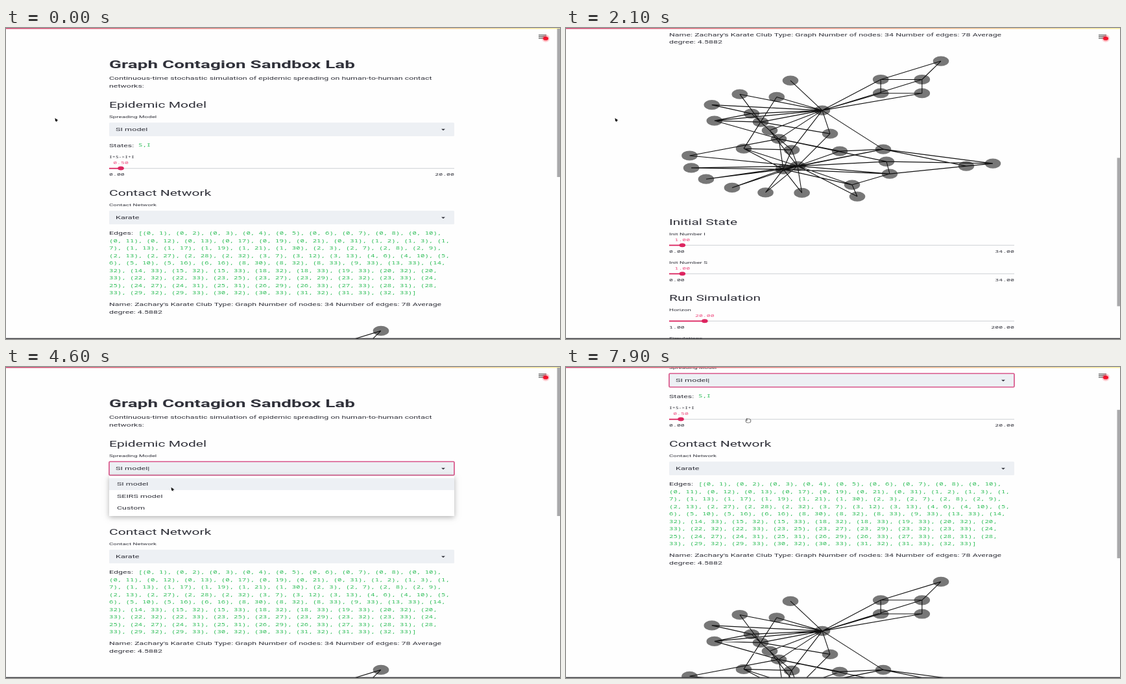
An HTML page with a canvas for the animation above (8 s loop, 854 by 480 pixels).

```html
<!DOCTYPE html>
<html lang="en">
<head>
<meta charset="utf-8">
<title>Graph Contagion Sandbox Lab</title>
<style>
  html, body { margin: 0; width: 854px; height: 480px; overflow: hidden; background: #fefefe; }
  canvas { display: block; }
</style>
</head>
<body>
<canvas id="stage" width="854" height="480"></canvas>
<script>
const ctx = document.getElementById('stage').getContext('2d');
const LOOP = 8000, STEP = 100;
const LEFT = 159, RIGHT = 691, WIDTH = RIGHT - LEFT;
const KX = 0.762, KY = 0.45;            // the whole page is shown wide and flat
const INK = '#30313a', PINK = '#dd2560', FIELD = '#edf0f4', GREEN = '#2dbd57';
const SANS = 'Roboto, sans-serif', MONO = '"Noto Sans Mono", "Liberation Mono", monospace';

// The karate club as circles of friends: members all know each other,
// and each guest knows every member.
const links = new Map();
function join(members, ...guests) {
  const link = (a, b) => links.set(a * 100 + b, [a, b]);
  members.forEach((a, i) => {
    members.slice(i + 1).forEach(b => link(a, b));
    guests.forEach(b => link(Math.min(a, b), Math.max(a, b)));
  });
}
join([0, 1, 2, 3], 7, 13);
join([0, 1], 17, 19, 21);
join([0, 4], 6, 10);
join([0, 5], 6, 10);
join([5, 6], 16);
join([0, 2], 8);
join([0, 3], 12);
join([0], 11, 31);
join([1], 30);
join([2], 9, 27, 28, 32);
join([32, 33], 14, 15, 18, 20, 22, 31);
join([8, 30, 32, 33]);
join([23, 29, 32, 33]);
join([33], 9, 13, 19, 26, 27, 28);
join([24, 25], 31);
join([23], 25, 27);
join([24], 27);
join([26], 29);
join([28], 31);
const edges = [...links.keys()].sort((a, b) => a - b).map(key => links.get(key));

// Nodes are laid out in rows and arcs
const nodes = [];
const row = (ids, x, y, dx = 0, dy = 0) =>
  ids.forEach((id, i) => nodes[id] = [x + i * dx, y + i * dy]);
const arc = (ids, x, y, rx, ry, from, turn) => ids.forEach((id, i) => {
  const a = (from + i * turn) * Math.PI / 180;
  nodes[id] = [x + rx * Math.cos(a), y + ry * Math.sin(a)];
});
row([0, 19], 395, 128, 12, 36);
row([3, 1, 13, 2], 286, 133, 14, 13);
row([30, 8, 28], 274, 187, 74, 2);
row([31, 27, 23], 489, 188, 5, 19);
row([25, 24], 617, 214, 41, -4);
row([29, 26], 441, 243, 8, 18);
row([32, 33], 335, 219, 22, -5);
row([11], 346, 82);
row([16], 578, 52);
arc([4, 6, 5, 10], 517, 91, 45, 15, 135, 90);
arc([7, 12, 17, 21], 286, 130, 66, 28, 150, 52);
arc([9, 14, 15, 18, 20, 22], 340, 205, 151, 51, 188, -21.4);

// Wrapped edge list; the first line leaves room for its label
function wrap(words, room) {
  const lines = [''];
  for (const word of words) {
    const last = lines.length - 1, next = (lines[last] + ' ' + word).trim();
    if (next.length > (last ? room : room - 7)) lines.push(word);
    else lines[last] = next;
  }
  return lines;
}
const edgeLines = wrap(`[${edges.map(e => `(${e.join(', ')})`).join(', ')}]`.split(' '), 83);

// Motion: progress from 0 to 1 between two times
const ramp = (t, from, to) => Math.max(0, Math.min(1, (t - from) / (to - from)));
const ease = p => p * p * (3 - 2 * p);
const scrollAt = t =>
  435 * (ramp(t, 0, 1810) - ease(ramp(t, 2000, 2800))) + 136 * ramp(t, 7200, 7800);
function pointerAt(t) {
  const enter = ramp(t, 2700, 3300), choose = ramp(t, 4200, 5100), rise = ramp(t, 5400, 5600);
  const leave = ramp(t, 6600, 6900), back = ramp(t, 7200, 7600);
  return [
    77 + 156 * enter + 52 * choose - 213 * leave + 209 * back,
    142 + 24 * enter + 51 * choose - 41 * rise - 2 * leave - 91 * back
  ];
}

// y is the middle of the capitals
function text(s, x, y, { size = 16.3, weight = 400, font = SANS, color = INK, align = 'left' } = {}) {
  ctx.save();
  ctx.translate(x, y + 0.36 * size * KY);
  ctx.scale(KX, KY);
  ctx.font = `${weight} ${size}px ${font}`;
  ctx.fillStyle = color;
  ctx.textAlign = align;
  ctx.fillText(s, 0, 0);
  ctx.restore();
}
const heading = (s, y) => text(s, LEFT, y, { size: 27.6 });
const label = (s, y) => text(s, LEFT, y, { size: 12.8 });
const mono = (s, x, y, style) => text(s, x, y, { size: 13, font: MONO, ...style });
const code = (s, x, y) => mono(s, x, y, { size: 14, color: GREEN });

function rect(x, y, w, h, color) {
  ctx.fillStyle = color;
  ctx.fillRect(x, y, w, h);
}
function ellipse(x, y, rx, ry, color) {
  ctx.beginPath();
  ctx.ellipse(x, y, rx, ry, 0, 0, 7);
  ctx.fillStyle = color;
  ctx.fill();
}
function polygon(color, ...points) {
  ctx.beginPath();
  points.forEach(p => ctx.lineTo(...p));
  ctx.fillStyle = color;
  ctx.fill();
}

function slider(name, y, min, value, max, style) {
  const knob = LEFT + 5 + (WIDTH - 10) * (value - min) / (max - min);
  text(name, LEFT, y, { size: 12.8, ...style });
  mono(value.toFixed(2), knob, y + 9, { color: '#ee4d80', align: 'center' });
  rect(LEFT, y + 17, WIDTH, 1.3, '#d8dadd');
  rect(LEFT, y + 16.8, knob - LEFT, 1.8, PINK);
  ellipse(knob, y + 17.6, 4.8, 3, PINK);
  mono(min.toFixed(2), LEFT, y + 27);
  mono(max.toFixed(2), RIGHT, y + 27, { align: 'right' });
}

function select(value, y, focused) {
  ctx.beginPath();
  ctx.roundRect(LEFT, y - 10.5, WIDTH, 21, 1.5);
  ctx.fillStyle = FIELD;
  ctx.fill();
  if (focused) {
    ctx.strokeStyle = '#d9568a';
    ctx.lineWidth = 1.7;
    ctx.stroke();
  }
  text(value + (focused ? '|' : ''), 169, y, { size: 16.6 });
  polygon(INK, [671, y - 0.8], [677, y - 0.8], [674, y + 1.8]);
}

function menu(active) {
  ctx.save();
  ctx.shadowColor = 'rgba(0,0,0,.3)';
  ctx.shadowBlur = 8;
  ctx.shadowOffsetY = 2;
  rect(LEFT, 168, WIDTH, 62, '#fff');
  ctx.restore();
  rect(LEFT, 171.5 + active * 18.3, WIDTH, 18.5, FIELD);
  ['SI model', 'SEIRS model', 'Custom'].forEach((s, i) => text(s, 171, 180.7 + i * 18.3));
}

function graph(top) {
  ctx.save();
  ctx.translate(0, top);
  nodes.forEach(([x, y]) => ellipse(x, y, 12.3, 7.6, '#777'));
  ctx.beginPath();
  for (const [a, b] of edges) {
    ctx.moveTo(...nodes[a]);
    ctx.lineTo(...nodes[b]);
  }
  ctx.strokeStyle = '#111';
  ctx.lineWidth = 1.1;
  ctx.stroke();
  ctx.restore();
}

function page(t, custom, pointerY) {
  text('Graph Contagion Sandbox Lab', LEFT, 56.5, { size: 36.6, weight: 700 });
  text('Continuous-time stochastic simulation of epidemic spreading on human-to-human contact', LEFT, 77.5);
  text('networks:', LEFT, 89);
  heading('Epidemic Model', 118.3);
  label('Spreading Model', 136.5);
  select(custom ? 'Custom' : 'SI model', 156.5, t >= 3300);
  if (!custom) {
    text('States:', LEFT, 181);
    code('S,I', 204, 181);
    slider('I+S->I+I', 199, 0, 0.5, 20, { size: 10.6, font: MONO });
  }

  ctx.save();
  if (custom) ctx.translate(0, 6);
  heading('Contact Network', 254.3);
  label('Contact Network', 272.5);
  select('Karate', 292.5);
  text('Edges:', LEFT, 316.5);
  edgeLines.forEach((s, i) => code(s, i ? LEFT : 204, 316.8 + i * 11.5));
  text("Name: Zachary's Karate Club Type: Graph Number of nodes: 34 Number of edges: 78 Average", LEFT, 426.5);
  text('degree: 4.5882', LEFT, 438);
  if (custom) {
    text('Contact network', LEFT, 457, { size: 12.8, color: '#c4c4c8' });
  } else {
    graph(415.4);
    heading('Initial State', 715.5);
    slider('Init Number I', 734, 0, 1, 34);
    slider('Init Number S', 778, 0, 1, 34);
    heading('Run Simulation', 833);
    slider('Horizon', 851, 1, 20, 200);
    label('Simulations', 895);
  }
  ctx.restore();

  const open = (t >= 3300 && t < 5400) || (t >= 6000 && t < 6700);
  if (open) menu(Math.max(0, Math.min(2, Math.floor((pointerY - 171) / 18.3))));
}

function pointer(t, x, y) {
  if (t >= 7600) {
    ellipse(x, y, 4.4, 3.6, '#777');
    ellipse(x, y, 3.3, 2.6, '#fff');
    rect(x - 3, y - 4, 1.5, 4, '#777');
  } else if (y > 147 && y < 168 && x > LEFT) {
    rect(x - 0.5, y - 4, 1, 8, '#aaa');
  } else {
    polygon('#111', [x - 1.5, y - 3], [x + 3.5, y + 0.5], [x + 1.2, y + 1], [x + 2, y + 3], [x - 1, y + 1.5]);
  }
}

function chrome(scroll, custom, running) {
  const bar = ctx.createLinearGradient(0, 0, 854, 0);
  ['#cf4670', '#eda08c', '#f7ed9e'].forEach((color, i) => bar.addColorStop(i / 2, color));
  rect(0, 0, 854, 1.5, bar);
  rect(0, 478.6, 854, 1.4, '#3c3c40');
  rect(849.5, 1 + scroll * 0.479, 4.5, custom ? 179 : 229, '#a9a9ab');

  if (running) {
    ellipse(683, 13, 3, 3, '#e2e2e5');
    text('Running...', 698, 13.5, { color: '#e2e2e5' });
    text('Stop', 771, 13.5, { color: '#e2e2e5' });
  }
  for (let i = 0; i < 3; i++) rect(821, 10.3 + i * 2.5, 12, 1.2, '#555');
  const glow = ctx.createRadialGradient(832, 16, 1, 832, 16, 7);
  glow.addColorStop(0, 'rgba(255,20,40,.6)');
  glow.addColorStop(1, 'rgba(255,20,40,0)');
  ellipse(832, 16, 7, 6, glow);
  ellipse(832, 16.2, 4, 2.6, '#f5122c');
}

function draw(now) {
  const t = Math.floor(now % LOOP / STEP) * STEP;
  const scroll = scrollAt(t), [x, y] = pointerAt(t);
  const custom = t >= 5400 && t < 6700;
  const running = (t >= 5400 && t < 5800) || (t >= 6700 && t < 7100);
  rect(0, 0, 854, 480, '#fefefe');
  ctx.save();
  ctx.translate(0, -scroll);
  page(t, custom, y);
  ctx.restore();
  chrome(scroll, custom, running);
  pointer(t, x, y);
}

const start = performance.now();
(function frame() {
  draw(performance.now() - start);
  requestAnimationFrame(frame);
})();
</script>
</body>
</html>
```
